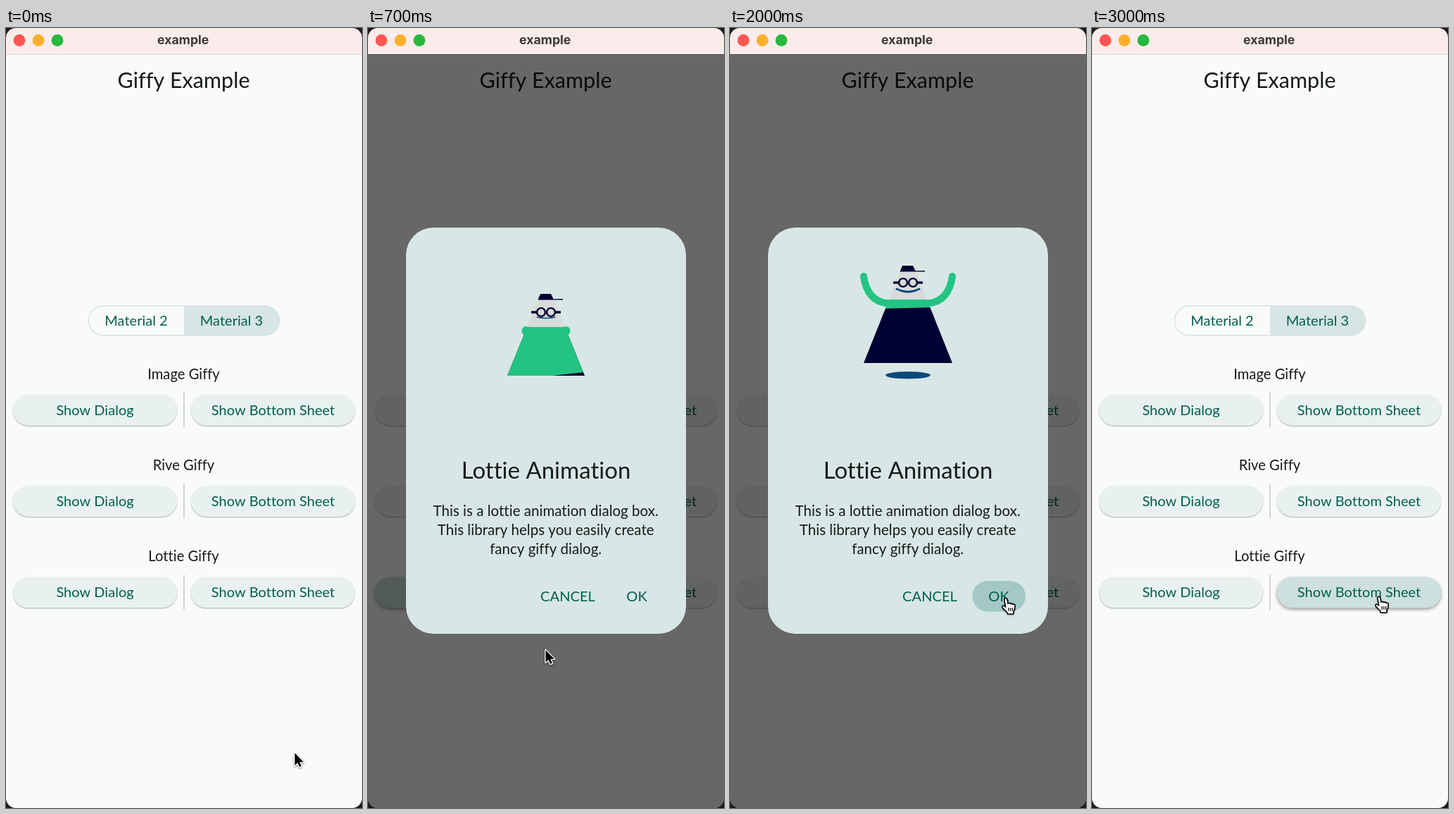
Write an HTML page with a canvas that moves like this. It is 506 by 1106 pixels and loops after 3100 ms.

```html
<!DOCTYPE html>
<html lang="en">
<head>
<meta charset="utf-8">
<title>Dialog demo</title>
<style>
html, body { margin: 0; width: 100%; height: 100%; overflow: hidden; background: #1b1b1b; }
canvas { display: block; width: 506px; height: 1106px; }
</style>
</head>
<body>
<canvas id="stage"></canvas>
<script>
const W = 506, H = 1106, LOOP = 3100, STEP = 100;
const SANS = 'Lato, "Open Sans", sans-serif';
const TEAL = '#00604f', INK = '#161a19', NAVY = '#000033', GREEN = '#23c483', BLUE = '#0c4878';

const dpr = window.devicePixelRatio || 1;
const setup = cv => {
  cv.width = W * dpr;
  cv.height = H * dpr;
  const ctx = cv.getContext('2d');
  ctx.scale(dpr, dpr);
  ctx.letterSpacing = '0.02px'; // any spacing turns ligatures off
  return ctx;
};
const main = setup(document.getElementById('stage'));
const layer = setup(document.createElement('canvas'));
let g = main;

const clamp = (v, lo = 0, hi = 1) => Math.min(hi, Math.max(lo, v));
const ramp = (t, from, to) => clamp((t - from) / (to - from));
const smooth = p => p * p * (3 - 2 * p);

// Rows start with their time; the rest of each row is interpolated.
function sample(rows, t) {
  let i = 0;
  while (i < rows.length - 2 && t >= rows[i + 1][0]) i++;
  const [a, b] = [rows[i], rows[i + 1]];
  const p = smooth(ramp(t, a[0], b[0]));
  return a.slice(1).map((v, k) => v + (b[k + 1] - v) * p);
}

function box(x, y, w, h, r, fill) {
  g.beginPath();
  g.roundRect(x, y, w, h, r);
  g.fillStyle = fill;
  g.fill();
}

function disc(x, y, rx, ry, fill) {
  g.beginPath();
  g.ellipse(x, y, rx, ry, 0, 0, 7);
  g.fillStyle = fill;
  g.fill();
}

function poly(points, fill) {
  g.beginPath();
  points.forEach(([x, y]) => g.lineTo(x, y));
  g.fillStyle = fill;
  g.fill();
}

function curve(x0, y0, cx, cy, x1, y1, width, color) {
  g.beginPath();
  g.moveTo(x0, y0);
  g.quadraticCurveTo(cx, cy, x1, y1);
  g.lineCap = 'round';
  g.lineWidth = width;
  g.strokeStyle = color;
  g.stroke();
}

function text(str, x, y, size, color = INK, font = SANS, weight = 400) {
  g.font = `${weight} ${size}px ${font}`;
  g.textAlign = 'center';
  g.fillStyle = color;
  g.fillText(str, x, y);
}

function shadow(color, blur, dy) {
  g.shadowColor = color;
  g.shadowBlur = blur * dpr;
  g.shadowOffsetY = dy * dpr;
}

function button(label, x, y, hot, fill, ripple) {
  g.save();
  if (hot) shadow('rgba(0,0,0,.4)', 5, 2.2);
  else shadow('rgba(0,30,30,.34)', 1.6, 1);
  box(x, y, 233, 43.7, 21.85, hot ? fill : '#e9f1f0');
  g.restore();
  if (ripple) {
    g.save();
    g.beginPath();
    g.roundRect(x, y, 233, 43.7, 21.85);
    g.clip();
    disc(121, 801, ripple, ripple, '#b6d2cf');
    g.restore();
  }
  text(label, x + 116.5, y + 28.7, 20, TEAL);
}

function page(t) {
  box(0, 36, W, H, 0, '#f9fbf9');
  box(0, 37, W, 1, 0, '#d9d3d1');
  text('Giffy Example', 252.5, 85, 30.5);

  g.save();
  g.beginPath();
  g.roundRect(117, 394, 272, 42, 21);
  g.clip();
  box(253, 394, 136, 42, 0, '#d7e6e4');
  g.restore();
  g.beginPath();
  g.roundRect(117.3, 394, 271.5, 42, 21);
  g.lineWidth = 1.4;
  g.strokeStyle = '#d5e4e2';
  g.stroke();
  text('Material 2', 185, 422, 20, TEAL);
  text('Material 3', 320.5, 422, 20, TEAL);

  const overLeft = t >= 400 && t < 800;
  const overRight = t >= 2800;
  ['Image', 'Rive', 'Lottie'].forEach((name, i) => {
    const y = 520 + 129.3 * i, last = i === 2;
    text(name + ' Giffy', 252.5, y - 22.5, 20.2);
    box(252.4, y - 3, 1.2, 49, 0, '#b4b9b7');
    const ripple = last && t >= 500 && t < 700 ? 38 + (t - 500) * .8 : 0;
    button('Show Dialog', 10, y, last && overLeft, '#c5dcd9', ripple);
    button('Show Bottom Sheet', 263, y, last && overRight, '#cde0dd');
  });
}

function titleBar() {
  box(0, 0, W, 37, 0, '#f9ecea');
  ['#fe5650', '#fdb02a', '#27b83f'].forEach((c, i) => disc(19 + 27 * i, 17.5, 8.4, 8.4, c));
  text('example', 251.7, 23, 17.7, '#3d3837', 'Inter, sans-serif', 700);
}

// phase, hat, shoulder, base, half width, hem left, hem right, eyes,
// smile (half, y, dip, line), arm (bend x, y, tip x, y, width), shadow
const crouch = [377, 424, 493, 55, 500.5, 487.5, 403, 13, 410, 3, 1.5, 27, 431, 26, 431, 13, 0];
const poses = [
  [0, ...crouch],
  [.1, 367, 414, 493, 59, 471, 458.5, 393, 12, 400, 3, 1.5, 36, 419, 40, 411, 9, 0],
  [.3, 337, 385, 475, 63, 398.5, 395.5, 361, 16, 370, 8, 3, 58, 388, 63, 352, 10, 32],
  [.5, 341, 390, 480, 63, 397.5, 397.5, 362, 16, 374, 7, 4, 50, 375, 80, 385, 9, 20],
  [.65, 362, 409, 493, 60, 440, 433, 386, 15, 394, 5, 2.5, 44, 412, 58, 424, 9, 0],
  [.85, ...crouch],
  [1, ...crouch]
];

function character(t) {
  const phase = (((t - 700) % 1000) + 1000) % 1000 / 1000;
  const [hat, chest, base, half, hemL, hemR, eyes, smile, smileY, dip, line,
    bendX, bendY, tipX, tipY, armW, shade] = sample(poses, phase);
  g.save();
  g.translate(253, 0);
  if (shade > 1) disc(0, 492.3, shade, shade * .16, BLUE);

  g.save();
  g.beginPath();
  [[-10.5, hat + 7], [10.5, hat + 7], [half, base], [-half, base]].forEach(([x, y]) => g.lineTo(x, y));
  g.clip();
  box(-70, hat, 140, 170, 0, '#d9dadb');
  box(-70, chest, 140, 170, 0, NAVY);
  poly([[-60, chest], [60, chest], [60, hemR], [-60, hemL]], GREEN);
  g.restore();

  for (const s of [-1, 1]) {
    curve(s * 28, chest + 5.5, s * bendX, bendY, s * tipX, tipY, armW, GREEN);
    g.beginPath();
    g.arc(s * 7, eyes, 5.9, 0, 7);
    g.lineWidth = 2.4;
    g.strokeStyle = NAVY;
    g.stroke();
    box(s > 0 ? 13 : -21, eyes - 1.7, 8, 3.4, 0, NAVY);
  }
  curve(-smile, smileY, 0, smileY + dip, smile, smileY, line, BLUE);
  poly([[-8, hat], [7, hat], [10.5, hat + 7.2], [24, hat + 7], [24, hat + 8.4], [-11.5, hat + 8.6]], NAVY);
  g.restore();
}

function dialog(t) {
  g.clearRect(0, 0, W, H);
  box(54, 283, 398, 576, 39, '#d8e7e5');
  character(t);
  text('Lottie Animation', 253, 638.5, 33);
  ['This is a lottie animation dialog box.', 'This library helps you easily create', 'fancy giffy dialog.']
    .forEach((s, i) => text(s, 252.7, 691.5 + 27 * i, 20.5));
  if (t >= 1100) {
    box(344.5, 784, 75.5, 43.5, 21.75, '#c4dbd8');
    g.globalAlpha = ramp(t, 1600, 2000) * ramp(t, 2850, 2700);
    box(344.5, 784, 75.5, 43.5, 21.75, '#a3c8c6');
    g.globalAlpha = 1;
  }
  text('CANCEL', 284, 812.7, 20.1, TEAL);
  text('OK', 382, 812.7, 20.1, TEAL);
}

const route = [
  [0, 410.5, 1028], [500, 119, 793], [700, 252.5, 882], [1200, 388, 806],
  [2000, 392.5, 808], [2800, 392.5, 808], [3000, 408.5, 806]
];
const arrow = new Path2D('M0 0V17.5L4 13.8L6.6 19.8L9.2 18.6L6.9 12.8H12.4Z');
const hand = new Path2D('M5 3.5C5 .5 8.5 .5 9 3.5L10 9C11 7.5 13 7.8 13.2 9.3C14.5 8 16.3 8.5 16.4 10' +
  'C18 9 19.8 10 19.5 12L19 17L17.5 20V23H9.5L8.5 20.5L3 15C1.2 12.5 3 10.8 5 12L6.8 13.5Z');
const creases = new Path2D('M11 14.5V19M13.6 14.5V19M16.2 14.5V19');

function cursor(t) {
  const [x, y] = sample(route, t);
  const pointing = (t >= 400 && t < 700) || t >= 1100;
  g.save();
  g.translate(x, y);
  g.lineJoin = 'round';
  shadow('rgba(0,0,0,.4)', 3, 1.5);
  if (pointing) {
    g.translate(-8, -1);
    g.scale(1.06, 1.04);
    g.fillStyle = '#fff';
    g.fill(hand);
    g.shadowColor = 'transparent';
    g.strokeStyle = '#000';
    g.lineWidth = 1.5;
    g.stroke(hand);
    g.lineWidth = 1.2;
    g.stroke(creases);
  } else {
    g.strokeStyle = '#fff';
    g.lineWidth = 2.6;
    g.stroke(arrow);
    g.shadowColor = 'transparent';
    g.fillStyle = '#000';
    g.fill(arrow);
  }
  g.restore();
}

function draw(t) {
  const shown = t < 1700 ? ramp(t, 530, 630) : ramp(t, 2860, 2760);
  g = main;
  box(0, 0, W, H, 0, '#1b1b1b');
  g.save();
  g.beginPath();
  g.roundRect(0, 0, W, H, 14);
  g.clip();
  page(t);
  if (shown) {
    box(0, 37, W, H, 0, `rgba(0,0,0,${.59 * shown})`);
    g = layer;
    dialog(t);
    g = main;
    g.globalAlpha = shown < 1 ? shown * .9 : 1;
    g.drawImage(layer.canvas, 0, 0, W, H);
    g.globalAlpha = 1;
  }
  titleBar();
  cursor(t);
  g.restore();
}

const start = performance.now();
function tick() {
  const t = (performance.now() - start) % LOOP;
  draw(Math.floor(t / STEP) * STEP);
  requestAnimationFrame(tick);
}
tick();
</script>
</body>
</html>
```
